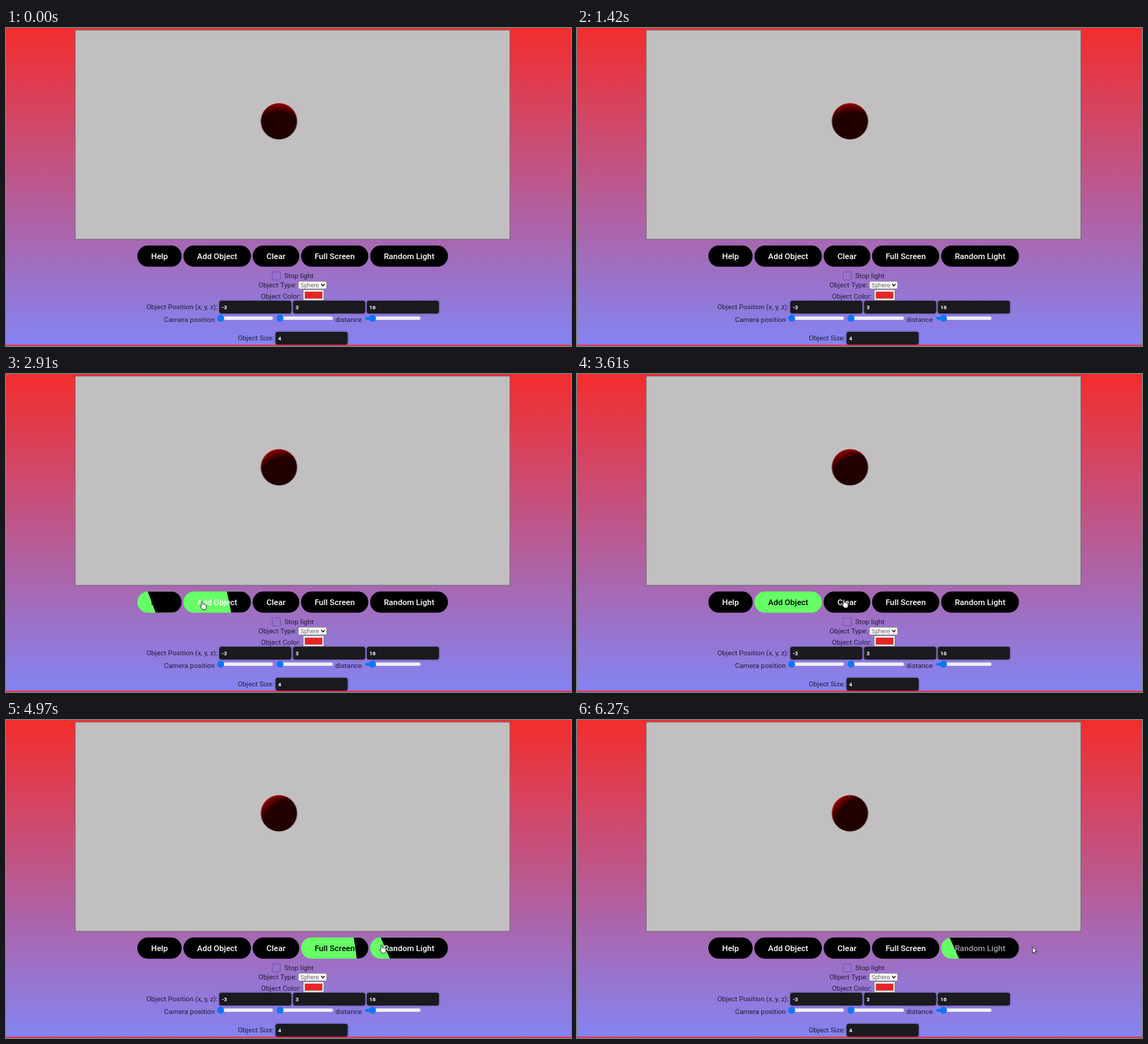
An HTML page with a canvas for the animation above (6300 ms loop, 800 px wide and 450 px high).

```html
<!DOCTYPE html>
<html lang="en">
<head>
<meta charset="utf-8">
<title>Sphere scene controls</title>
<style>
html, body { margin: 0; width: 100%; height: 100%; overflow: hidden; }
canvas { display: block; }
</style>
</head>
<body>
<canvas id="stage" width="800" height="450"></canvas>
<script>
const LOOP = 6300;
const ctx = document.getElementById('stage').getContext('2d');
const GREEN = '#66ff66', BLUE = '#0f75f5', INK = '#231b35';

// label, left, width, hover start, hover end
const buttons = [
  ['Help', 186, 62.7, 2210, 2790],
  ['Add Object', 251.2, 95.6, 2790, 3615],
  ['Clear', 349.3, 66, 3615, 4240],
  ['Full Screen', 417.8, 95.2, 4240, 4937],
  ['Random Light', 515.6, 110.2, 4937, 6105]
];

// time, x, y of the pointer
const path = [
  [1560, -12, 345], [1960, 150, 333], [2180, 193, 328], [2500, 214, 324],
  [2780, 255, 322], [3050, 302, 321], [3350, 322, 320], [3610, 378, 319],
  [3950, 390, 320], [4220, 420, 321], [4390, 471, 320], [4700, 490, 319],
  [4970, 532, 318], [5400, 566, 319], [5800, 598, 320], [6100, 627, 321],
  [6270, 645, 321]
];

const clamp = v => Math.max(0, Math.min(1, v));

// cubic-bezier(.3, 1, .8, 1)
function ease(x) {
  x = clamp(x);
  let lo = 0, hi = 1;
  for (let i = 0; i < 20; i++) {
    const s = (lo + hi) / 2, r = 1 - s;
    if (0.9 * r * r * s + 2.4 * r * s * s + s * s * s < x) lo = s; else hi = s;
  }
  return 1 - Math.pow(1 - lo, 3);
}

function rounded(x, y, w, h, r) {
  ctx.beginPath();
  ctx.roundRect(x, y, w, h, r);
}

function box(x, y, w, h, r, color) {
  rounded(x, y, w, h, r);
  ctx.fillStyle = color;
  ctx.fill();
}

function disc(x, y, r, color) {
  ctx.beginPath();
  ctx.arc(x, y, r, 0, 7);
  ctx.fillStyle = color;
  ctx.fill();
}

function text(str, x, y, font, color, align = 'left') {
  ctx.font = font;
  ctx.textAlign = align;
  ctx.fillStyle = color;
  ctx.fillText(str, x, y);
}

const label = (str, x, y) => text(str, x, y, '9.85px Roboto, sans-serif', INK);

function drawBackground() {
  const g = ctx.createLinearGradient(0, 0, 0, 448);
  g.addColorStop(0, '#f22d2d');
  g.addColorStop(1, '#8484f2');
  ctx.fillStyle = g;
  ctx.fillRect(0, 0, 800, 448);
  ctx.fillStyle = '#e03a52';
  ctx.fillRect(0, 448, 800, 2);
  ctx.fillStyle = '#69636c';
  ctx.fillRect(97.5, 2.5, 616.5, 297);
  ctx.fillStyle = '#c1bfc0';
  ctx.fillRect(98.4, 3.4, 614.7, 295.2);
}

const ball = document.createElement('canvas');
ball.width = ball.height = 54;
const ballCtx = ball.getContext('2d');
const shade = ballCtx.createImageData(54, 54);

// Lambert shading with the light slightly behind the sphere
function drawSphere(t) {
  const R = 25.6, a = (-87 - 48 * t / LOOP) * Math.PI / 180;
  const lx = 0.89 * Math.cos(a), ly = 0.89 * Math.sin(a), lz = -0.45;
  for (let y = 0; y < 54; y++) {
    for (let x = 0; x < 54; x++) {
      const nx = (x - 26.5) / R, ny = (y - 26.5) / R;
      const nz = Math.sqrt(Math.max(0, 1 - nx * nx - ny * ny));
      const lit = Math.max(0, nx * lx + ny * ly + nz * lz);
      const i = (y * 54 + x) * 4;
      shade.data[i] = 32 + 160 * lit;
      shade.data[i + 3] = 255 * clamp((1 - Math.hypot(nx, ny)) * R + 0.5);
    }
  }
  ballCtx.putImageData(shade, 0, 0);
  ctx.drawImage(ball, 359.5, 105);
}

function drawButton([name, x, w, start, end], t) {
  const y = 307.8, h = 30, left = t >= end;
  const since = t - (left ? end : start);
  const slide = ease(since / 400), fade = clamp((since - 150) / 25);
  const p = left ? 1 - slide : slide, dark = left ? 1 - fade : fade;

  if (p < 0.001) {
    box(x, y, w, h, 15, '#000');
  } else {
    ctx.save();
    box(x, y, w, h, 15, GREEN);
    ctx.clip();
    const edge = x - 0.1 * w + 1.2 * w * p;
    const skew = Math.tan(Math.PI / 6) * (1 - p) * h / 2;
    ctx.beginPath();
    ctx.moveTo(edge - skew, y);
    ctx.lineTo(edge + 1.2 * w - skew, y);
    ctx.lineTo(edge + 1.2 * w + skew, y + h);
    ctx.lineTo(edge + skew, y + h);
    ctx.fillStyle = '#000';
    ctx.fill();
    ctx.restore();
  }
  const c = Math.round(255 * (1 - dark));
  text(name, x + w / 2, 327, '500 11.5px Roboto, sans-serif', `rgb(${c},${c},${c})`, 'center');
}

function field(value, x, y) {
  ctx.save();
  ctx.shadowColor = 'rgba(40,30,60,.7)';
  ctx.shadowBlur = 3;
  box(x, y, 102, 18, 3, '#1b1a1f');
  ctx.restore();
  text(value, x + 3.6, y + 12, 'bold 7.6px Roboto, sans-serif', '#fff');
}

function slider(x, w, thumb) {
  box(x, 408.3, w, 4.8, 2.4, '#efeff2');
  if (thumb > x + 5) box(x, 408.3, thumb - x, 4.8, 2.4, BLUE);
  disc(thumb, 410.7, 4.9, BLUE);
}

function drawForm() {
  ctx.lineWidth = 1;
  ctx.strokeStyle = '#6558b8';
  rounded(377, 345, 11.5, 11.5, 1);
  ctx.stroke();
  label('Stop light', 394, 354);

  label('Object Type:', 357.5, 366.5);
  box(413.7, 358, 40.6, 11.5, 1.5, '#77727d');
  box(414.4, 358.7, 39.2, 10.1, 1, '#fff');
  text('Sphere', 416.7, 366.6, '8.3px Arial, "Liberation Sans", sans-serif', '#5c5c64');
  ctx.beginPath();
  ctx.moveTo(446.3, 362.3);
  ctx.lineTo(448.7, 365);
  ctx.lineTo(451.1, 362.3);
  ctx.strokeStyle = '#111';
  ctx.lineWidth = 1.3;
  ctx.stroke();

  label('Object Color:', 361, 382.5);
  box(420.3, 369.7, 30.4, 16.4, 0, '#77727d');
  box(421.2, 370.6, 28.6, 14.6, 0, '#f1eff1');
  box(423, 373, 25, 10, 0, '#777');
  box(423.5, 373.5, 24, 9, 0, '#ef2323');

  label('Object Position (x, y, z):', 198.8, 398);
  field('-3', 302, 386);
  field('3', 406.5, 386);
  field('16', 511, 386);

  label('Camera position', 223.8, 416);
  slider(300, 78, 304);
  slider(384, 79, 388);
  label('distance', 466.3, 416);
  slider(508, 79, 519);

  label('Object Size:', 328.3, 442);
  field('4', 381.7, 430);
}

const arrow = new Path2D('M0 0V9L2 7.2 3.5 10.4 5 9.7 3.6 6.6H6.4Z');
const hand = new Path2D('M1.8 1Q3 -.3 3.9 1V4.4Q5 3.8 5.7 4.8 6.7 4.2 7.3 5.2 8.6 4.9 8.8 6V9Q8.6 10.5 7.7 12H3.4Q2 9.8 .4 7.7 -.2 6.5 1.8 7Z');

function drawPointer(t) {
  const i = path.findIndex(k => k[0] > t);
  if (i === 0) return;
  const [b, a] = i < 0 ? [path[path.length - 1], path[path.length - 1]] : [path[i], path[i - 1]];
  const f = b === a ? 0 : (t - a[0]) / (b[0] - a[0]);
  const x = a[1] + (b[1] - a[1]) * f, y = a[2] + (b[2] - a[2]) * f;
  const over = buttons.some(k => x >= k[1] && x <= k[1] + k[2]) && y > 308 && y < 338;
  ctx.save();
  ctx.translate(over ? x - 3 : x, y);
  ctx.lineWidth = 0.9;
  ctx.lineJoin = 'round';
  ctx.strokeStyle = '#222';
  ctx.fillStyle = '#fff';
  ctx.fill(over ? hand : arrow);
  ctx.stroke(over ? hand : arrow);
  ctx.restore();
}

function frame(now) {
  const t = now % LOOP;
  drawBackground();
  drawSphere(t);
  buttons.forEach(b => drawButton(b, t));
  drawForm();
  drawPointer(t);
  requestAnimationFrame(frame);
}
requestAnimationFrame(frame);
</script>
</body>
</html>
```
